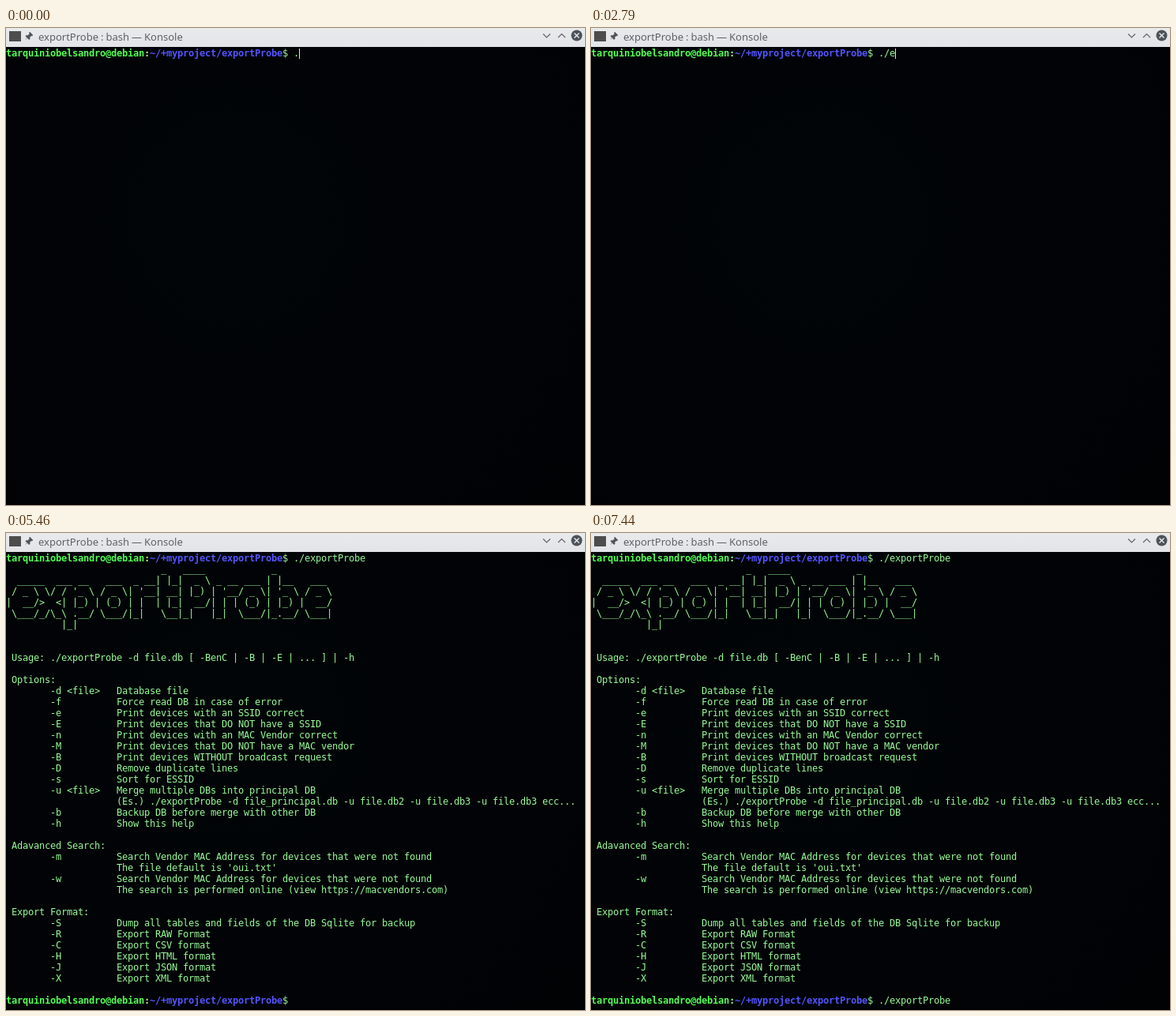
Recreate the animation shown at these times as an HTML page. Size 733x604 px, loop 8 s.

```html
<!DOCTYPE html>
<html lang="en">
<head>
<meta charset="utf-8">
<title>Terminal help screen</title>
<style>
  html, body { margin: 0; width: 100%; height: 100%; overflow: hidden; }
  body {
    position: relative;
    background: radial-gradient(circle at 290px 240px, #010507, #010306 310px, #010204 540px);
  }
  header {
    position: absolute; inset: 0 0 auto; height: 24px;
    background: linear-gradient(#e8eaec, #e2e4e7);
    color: #5d6267;
    font: 13px/22px "Noto Sans", sans-serif;
  }
  header span { position: absolute; left: 41px; top: 0; white-space: pre; word-spacing: -.4px; }
  header svg { position: absolute; left: 0; top: 0; }
  #terminal {
    position: absolute; left: 0; top: 25px;
    color: #98fb98;
    font: 12px/14px "DejaVu Sans Mono", monospace;
    letter-spacing: calc(7px - 1ch); /* 7px character cells */
  }
  pre { margin: 0; font: inherit; white-space: pre; }
  .prompt { height: 14px; white-space: pre; }
  b { color: #54ff54; }
  b i { color: #98fb98; font-style: normal; }
  b em { color: #5454ff; font-style: normal; }
  #cursor { position: absolute; width: 1px; height: 13px; background: #c0f8c8; }
</style>
</head>
<body>
<header>
  <svg width="733" height="24" fill="none" stroke="#5d6267" stroke-width="1.1">
    <rect x="4" y="4" width="15" height="13" fill="#4d4d4d" stroke="none"/>
    <path d="M30 5l4 4-1 1-1-.3-2 2 .2 2-1 1-4.400-4.400 1-1 2 .2 2-2-.3-1zM27 12l-2 2.500" fill="#4d5257" stroke-width=".6"/>
    <path d="M680 7.500l4.500 4.500 4.500-4.500M699 12l4.500-4.500 4.500 4.500"/>
    <circle cx="722.500" cy="9.500" r="7" fill="#4d5359" stroke="none"/>
    <path d="M719.500 6.500l6 6m0-6l-6 6" stroke="#eef0f1" stroke-width="1.300"/>
  </svg>
  <span>exportProbe : bash — Konsole</span>
</header>

<div id="terminal">
  <div class="prompt"></div>
  <pre id="help">
                            _   ____            _
  _____  ___ __   ___  _ __| |_|  _ \ _ __ ___ | |__   ___
 / _ \ \/ / '_ \ / _ \| '__| __| |_) | '__/ _ \| '_ \ / _ \
|  __/&gt;  &lt;| |_) | (_) | |  | |_|  __/| | | (_) | |_) |  __/
 \___/_/\_\ .__/ \___/|_|   \__|_|   |_|  \___/|_.__/ \___|
          |_|


 Usage: ./exportProbe -d file.db [ -BenC | -B | -E | ... ] | -h

 Options:
        -d &lt;file&gt;   Database file
        -f          Force read DB in case of error
        -e          Print devices with an SSID correct
        -E          Print devices that DO NOT have a SSID
        -n          Print devices with an MAC Vendor correct
        -M          Print devices that DO NOT have a MAC vendor
        -B          Print devices WITHOUT broadcast request
        -D          Remove duplicate lines
        -s          Sort for ESSID
        -u &lt;file&gt;   Merge multiple DBs into principal DB
                    (Es.) ./exportProbe -d file_principal.db -u file.db2 -u file.db3 -u file.db3 ecc...
        -b          Backup DB before merge with other DB
        -h          Show this help

 Adavanced Search:
        -m          Search Vendor MAC Address for devices that were not found
                    The file default is 'oui.txt'
        -w          Search Vendor MAC Address for devices that were not found
                    The search is performed online (view https://macvendors.com)

 Export Format:
        -S          Dump all tables and fields of the DB Sqlite for backup
        -R          Export RAW Format
        -C          Export CSV format
        -H          Export HTML format
        -J          Export JSON format
        -X          Export XML format

</pre>
  <div class="prompt"></div>
  <div id="cursor"></div>
</div>

<script>
  const LOOP = 8000, CELL = 7, ROW = 14, LAST_ROW = 40, PROMPT_COLUMNS = 52;
  const COMMAND = './exportProbe';
  const RUN_AT = 4080;

  // Each step: start time in ms, typed text, cursor visible
  const steps = [
    [0, '.', true],
    [560, './', true],
    [860, './e', true],
    [RUN_AT, '', true],
    [5460, '', false],
    [6440, COMMAND + ' ', true],
    [7440, COMMAND + ' ', false],
  ];

  const prompts = [...document.querySelectorAll('.prompt')];
  const typed = prompts.map(line => {
    line.innerHTML = '<b>tarquiniobelsandro@debian<i>:</i><em>~/+myproject/exportProbe</em></b>$ <span></span>';
    return line.lastChild;
  });
  const help = document.getElementById('help');
  const cursor = document.getElementById('cursor');
  let shown;

  function show(step) {
    const [start, text, cursorOn] = step;
    const ran = start >= RUN_AT;
    help.hidden = prompts[1].hidden = !ran;
    typed[0].textContent = ran ? COMMAND : text;
    typed[1].textContent = ran ? text : '';
    cursor.hidden = !cursorOn;
    cursor.style.left = (PROMPT_COLUMNS + text.length) * CELL + 'px';
    cursor.style.top = (ran ? LAST_ROW * ROW : 0) + 1 + 'px';
  }

  function tick() {
    const time = performance.now() % LOOP;
    const step = steps.findLast(([start]) => start <= time);
    if (step !== shown) show(shown = step);
    requestAnimationFrame(tick);
  }
  tick();
</script>
</body>
</html>
```
